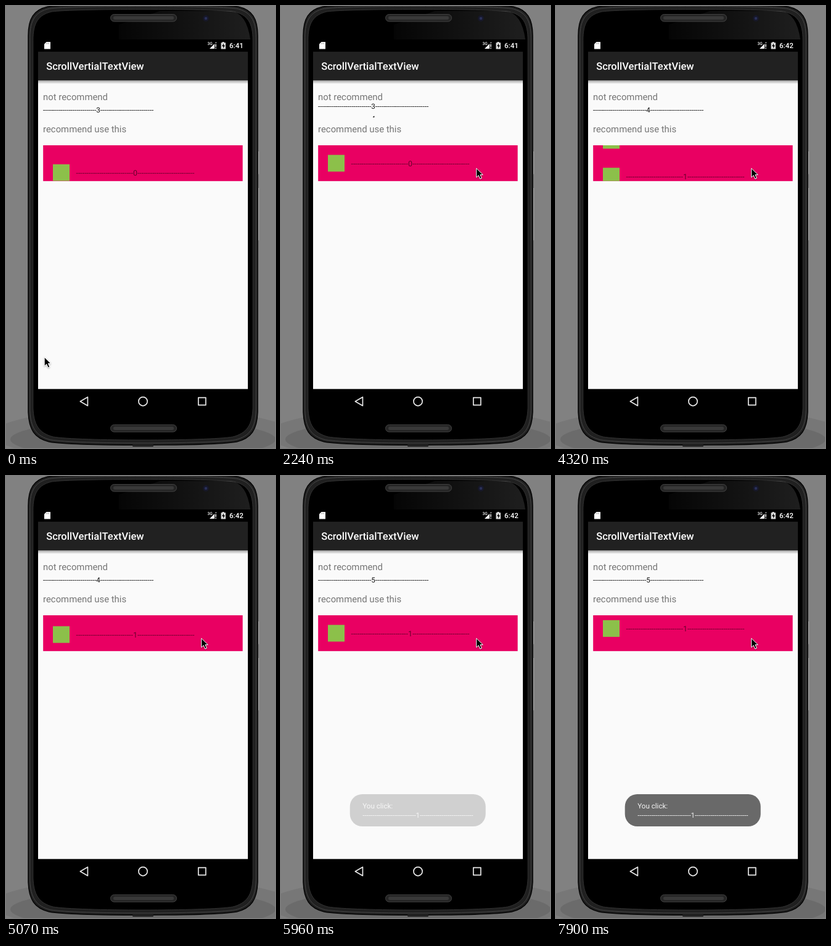
Animation, 436 px wide and 714 px high, one loop 8000 ms. Source, as an HTML page:

```html
<!DOCTYPE html>
<html lang="en">
<head>
<meta charset="utf-8">
<title>Vertical text scroller</title>
<style>
  html, body { margin: 0; width: 100%; height: 100%; overflow: hidden; background: #828282; }
  svg { display: block; width: 436px; height: 714px; }
  text { font-family: Roboto, sans-serif; text-rendering: geometricPrecision; white-space: pre; }
  .label { font-size: 14.875px; fill: #757575; }
  .small { font-size: 11.57px; }
  .item { font-size: 12.4px; fill: #000; fill-opacity: .56; }
  .bold { font-weight: 500; fill: #fff; }
</style>
</head>
<body>
<svg viewBox="0 0 436 714">
  <defs>
    <linearGradient id="gloss" x1="0" y1="0" x2="1" y2="0">
      <stop offset="0" stop-color="#fff" stop-opacity=".02"/>
      <stop offset="1" stop-color="#fff" stop-opacity=".12"/>
    </linearGradient>
    <linearGradient id="barShadow" x1="0" y1="0" x2="0" y2="1">
      <stop offset="0" stop-color="#000" stop-opacity=".34"/>
      <stop offset="1" stop-color="#000" stop-opacity="0"/>
    </linearGradient>
    <filter id="soft" x="-50%" y="-50%" width="200%" height="200%">
      <feDropShadow dx="0" dy=".8" stdDeviation=".8" flood-opacity=".4"/>
    </filter>
    <clipPath id="topClip"><rect x="60" y="156" width="324" height="24"/></clipPath>
    <clipPath id="rowClip"><rect x="60" y="225" width="324" height="57.85"/></clipPath>
    <path id="shell" d="M-186 -306C-186 -334 -177 -348 -154 -353C-120 -358 120 -358 154 -353C177 -348 186 -334 186 -306
      V302C185 330 176 344 152 350C110 357 -110 357 -152 350C-176 344 -185 330 -186 302Z"/>
    <g id="speaker">
      <rect x="169.5" y="13.5" width="107" height="11.5" rx="5.7" fill="#242424" stroke="#424242"/>
      <rect x="174" y="16.5" width="98" height="5.5" rx="2.7" fill="#393939"/>
    </g>
  </defs>

  <rect width="436" height="714" fill="#818181"/>
  <ellipse cx="222" cy="692" rx="245" ry="42" fill="#000" fill-opacity=".08"/>
  <ellipse cx="222" cy="700" rx="215" ry="32" fill="#000" fill-opacity=".1"/>

  <!-- phone -->
  <path d="M408 236V271M408 294.5V378" stroke="#555" stroke-width="2"/>
  <path d="M409.2 235V271.5M409.2 294V378.5" stroke="#ccc" stroke-width=".9"/>
  <g transform="translate(222 354)">
    <use href="#shell" fill="#202020" stroke="#050505" stroke-width="1.4"/>
    <use href="#shell" fill="none" stroke="#484848" transform="scale(.985 .991)"/>
    <use href="#shell" fill="#000" stroke="#343434" transform="scale(.958 .977)"/>
  </g>
  <path d="M183 30L250 8H365Q390 12 396 54H183Z" fill="url(#gloss)"/>
  <rect x="205" y="708" width="34" height="4" rx="1.5" fill="#222"/>
  <use href="#speaker"/>
  <use href="#speaker" y="663"/>
  <circle cx="324" cy="20" r="5" fill="#17182a"/>
  <circle cx="324" cy="20" r="2.3" fill="#292f58"/>

  <!-- screen -->
  <rect x="52" y="54" width="340" height="604" fill="#000"/>
  <rect x="52" y="73.8" width="340" height="46.4" fill="#212121"/>
  <rect x="52" y="120.2" width="340" height="498.5" fill="#fafafa"/>
  <rect x="52" y="120.2" width="340" height="5.8" fill="url(#barShadow)"/>

  <!-- status bar -->
  <path d="M65.5 58H72V69.5H62V61.5Z" fill="#fff"/>
  <path d="M65.5 59.5v2M67.5 59.5v2M69.5 59.5v2" stroke="#777" stroke-width=".7"/>
  <text class="bold" x="326.5" y="63" font-size="6.6">3G</text>
  <path d="M330 69L341 58V69Z" fill="#fff"/>
  <path d="M338 60h4v10h-4z" fill="#000"/>
  <path d="M340 61.5v4.7M340 67.4v1.6" stroke="#fff" stroke-width="1.5"/>
  <path d="M350.5 58h3v1.3h2.5V69.5h-7.5V59.3h2z" fill="#ddd"/>
  <path d="M353 60.5L350 65h2v3.2L355 63.6h-2z" fill="#000"/>
  <text class="bold small" id="clock" x="362" y="68">6:41</text>

  <text class="bold" x="65.2" y="103" font-size="16.53">ScrollVertialTextView</text>

  <!-- content -->
  <text class="label" x="60.1" y="152">not recommend</text>
  <g clip-path="url(#topClip)" id="plainList"></g>
  <text class="label" x="60.1" y="204">recommend use this</text>
  <rect x="60.2" y="225" width="323.4" height="57.85" fill="#e90062"/>
  <g clip-path="url(#rowClip)" id="iconList"></g>

  <g id="toast">
    <rect x="111.7" y="514" width="220" height="52" rx="20" fill="#696969"/>
    <g class="small" fill="#f4f4f4">
      <text x="132.3" y="537.3">You click:</text>
      <text x="132.3" y="552.3" id="toastLine"></text>
    </g>
  </g>

  <!-- navigation -->
  <g fill="none" stroke="#e8e8e8" stroke-width="1.7" stroke-linejoin="round">
    <path d="M120.3 638.7L132.4 631.7V645.7Z"/>
    <circle cx="222" cy="638.7" r="7.1"/>
    <rect x="311.8" y="632.7" width="12" height="12"/>
  </g>

  <path id="cursor" d="M0 0V14.6L3.5 11.4L6 17L8.6 15.9L6.2 10.4H10.6Z" filter="url(#soft)"
        fill="#000" stroke="#fff" stroke-width="1" stroke-linejoin="round"/>
</svg>

<script>
const LOOP = 8000, STEP = 149.06;
const CLOCK_CHANGE = 2970;
const CURSOR = { from: [62.2, 567.2], to: [316.7, 262.2], start: 1500, duration: 690 };
const TOAST = { start: 5850, duration: 400 };

const el = id => document.getElementById(id);
const clamp = v => Math.max(0, Math.min(1, v));
const ease = v => (1 - Math.cos(Math.PI * clamp(v))) / 2;
const progress = (t, { start, duration }) => (t - start) / duration;
const dashed = n => "-".repeat(27) + n + "-".repeat(27);

// Two rows per list: the one leaving upwards and the one replacing it.
function makeList(id, markup, options) {
  const host = el(id);
  host.innerHTML = `<g>${markup}</g>`.repeat(2);
  const rows = [...host.children];
  return t => {
    const { start, period, duration, spacing, first } = options;
    const n = Math.floor((t - start) / period);
    const p = ease((t - start - n * period) / duration);
    rows.forEach((row, i) => {
      row.setAttribute("transform", `translate(0 ${(i - p) * spacing})`);
      row.querySelector("text").textContent = dashed(Math.max(0, first + n - 1 + i));
    });
  };
}

const drawPlain = makeList("plainList",
  '<text class="small" x="60.1" y="172.4" fill="#111"></text>',
  { start: -1320, period: 3230, duration: 850, spacing: 20, first: 3 });

const drawIcons = makeList("iconList",
  '<rect x="76" y="240.5" width="27" height="27" fill="#8cc04a"/><text class="item" x="113.5" y="259"></text>',
  { start: -1710, period: 4497, duration: 2600, spacing: 57.85, first: 0 });

el("toastLine").textContent = dashed(1);

function draw(t) {
  drawPlain(t);
  drawIcons(t);
  el("clock").textContent = t < CLOCK_CHANGE ? "6:41" : "6:42";
  el("toast").setAttribute("opacity", clamp(progress(t, TOAST)));
  const p = ease(progress(t, CURSOR));
  const [x, y] = CURSOR.from.map((v, i) => v + (CURSOR.to[i] - v) * p);
  el("cursor").setAttribute("transform", `translate(${x} ${y})`);
}

function tick() {
  const t = performance.now() % LOOP;
  draw(Math.floor((t + 8) / STEP) * STEP);
  requestAnimationFrame(tick);
}
tick();
</script>
</body>
</html>
```
